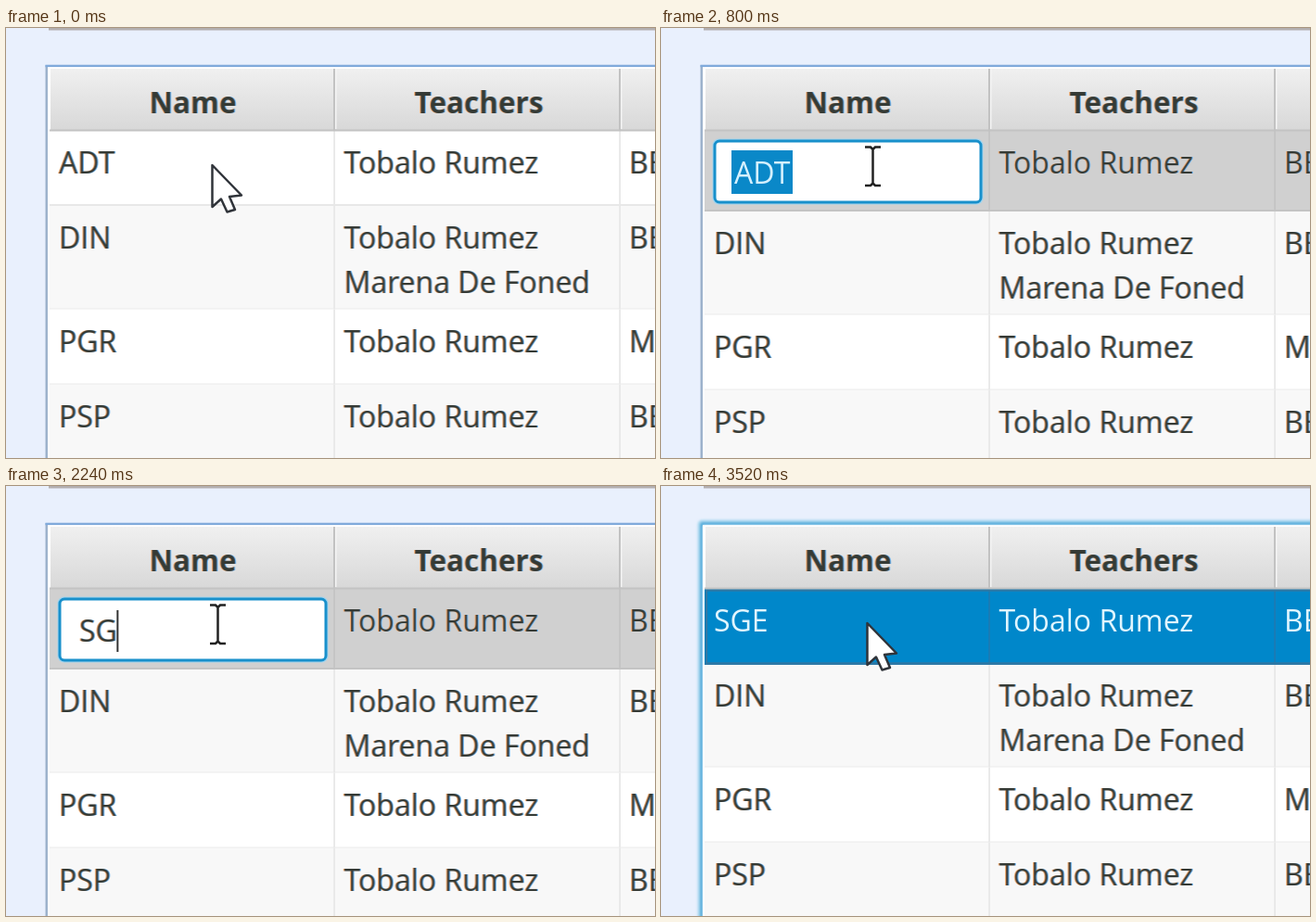
An HTML page for the animation above (3600 ms loop, 700 by 464 pixels).

```html
<!DOCTYPE html>
<html lang="en">
<head>
<meta charset="utf-8">
<title>Editable table cell</title>
<style>
  html, body { margin: 0; width: 100%; height: 100%; overflow: hidden; background: #e9f0fd; }
  svg { display: block; width: 700px; height: 464px; }
  text { font: 400 32px "Open Sans", "Noto Sans", sans-serif; fill: #3a3a3a; }
  .head { font-weight: 700; font-size: 31.5px; text-anchor: middle; }
  .lit text { fill: #e0f5ff; }
  .soft { filter: url(#fringe); }
</style>
</head>
<body>
<svg viewBox="0 0 700 464">
  <defs>
    <linearGradient id="headFill" x2="0" y2="1">
      <stop offset="0" stop-color="#f0f0f0"/>
      <stop offset="1" stop-color="#d8d8d8"/>
    </linearGradient>
    <!-- warm left and cool right edges, like subpixel text -->
    <filter id="fringe" filterUnits="userSpaceOnUse" x="0" y="0" width="700" height="464" color-interpolation-filters="sRGB">
      <feFlood flood-color="#f0b27a"/>
      <feComposite in2="SourceAlpha" operator="in"/>
      <feOffset dx="-1" result="warm"/>
      <feFlood flood-color="#7abcf0"/>
      <feComposite in2="SourceAlpha" operator="in"/>
      <feOffset dx="1" result="cool"/>
      <feFlood flood-color="#747074"/>
      <feComposite in2="SourceAlpha" operator="in" result="core"/>
      <feBlend in="warm" in2="cool" mode="multiply"/>
      <feBlend in2="core" mode="multiply"/>
      <feGaussianBlur stdDeviation="0.4"/>
    </filter>
    <filter id="glow" filterUnits="userSpaceOnUse" x="0" y="0" width="760" height="520">
      <feGaussianBlur stdDeviation="0.9"/>
    </filter>
  </defs>

  <rect width="700" height="464" fill="#e9f0fd"/>
  <rect x="46" y="-2" width="660" height="4.5" fill="#b3afb0"/>

  <g id="ring" fill="none" filter="url(#glow)">
    <rect x="41.5" y="38.5" width="690" height="450" rx="3" stroke="#a9d8f0" stroke-width="4"/>
    <rect x="43.5" y="40.5" width="690" height="450" rx="2" stroke="#4fabda" stroke-width="3"/>
  </g>
  <g id="edge">
    <rect x="42.5" y="40" width="2.5" height="440" fill="#9db2cc"/>
    <rect x="42.5" y="39.7" width="660" height="2.5" fill="#80aadb"/>
  </g>
  <rect x="45" y="42.2" width="680" height="440" fill="#fff"/>

  <g id="rows"></g>

  <rect x="48" y="44" width="660" height="66" fill="url(#headFill)"/>
  <rect x="47" y="109.5" width="660" height="2" fill="#c3c3c3"/>
  <g fill="#c2c2c2">
    <rect x="353" y="44" width="2" height="67"/>
    <rect x="661" y="44" width="2" height="67"/>
  </g>
  <g fill="#f4f4f4">
    <rect x="355" y="44" width="1.5" height="65"/>
    <rect x="663" y="44" width="1.5" height="65"/>
  </g>
  <g class="soft">
    <text class="head" x="201.5" y="92">Name</text>
    <text class="head" x="510" y="92">Teachers</text>
  </g>

  <g id="field">
    <rect x="55.5" y="119.5" width="292" height="71" rx="7" fill="#9fd3ee"/>
    <rect x="58" y="122" width="287" height="66" rx="5" fill="#fff" stroke="#1990cb" stroke-width="3"/>
    <rect id="mark" x="76" y="132" width="66" height="47" fill="#0a88c8"/>
    <text id="entry" x="79" y="168"></text>
    <rect id="caret" y="134" width="2" height="45" fill="#333"/>
  </g>

  <path id="beam" d="M220 128.5H226L228.5 131L231 128.5H237M228.5 130V168M220 170H226L228.5 167.5L231 170H237" fill="none" stroke="#222" stroke-width="2.5"/>
  <path id="arrow" d="M222.5 148V193L232 184.5L238.5 198.5L247 196L241 182L254 180.5Z" fill="#fff" stroke="#30343a" stroke-width="2.5" stroke-linejoin="round"/>
</svg>
<script>
const LOOP = 3600;
const SELECT = 320, EDIT = 560, COMMIT = 3280;
const TYPED = [[1920, "S"], [2160, "SG"], [2400, "SGE"]];
const COLS = [57, 364.5, 672];
const TUTOR = "Tobalo Rumez";
const ROWS = [
  { top: 110.5, cells: ["ADT", TUTOR, "BBE"], fill: "#fff" },
  { top: 191, cells: ["DIN", TUTOR, "BBE"], extra: "Marena De Foned", fill: "#f8f8f8" },
  { top: 303.5, cells: ["PGR", TUTOR, "ME"], fill: "#fff" },
  { top: 384.5, cells: ["PSP", TUTOR, "BBE"], fill: "#f8f8f8" }
];
const LOOKS = {
  plain: { fill: "#fff", line: "#e8e8e8", height: 81 },
  selected: { fill: "#0087ca", line: "#1c7bb3", height: 82 },
  editing: { fill: "#d0d0d0", line: "#c4c4c4", height: 87 }
};

const $ = id => document.getElementById(id);
const show = (id, on) => $(id).setAttribute("visibility", on ? "visible" : "hidden");

function add(parent, tag, attrs, content) {
  const el = document.createElementNS("http://www.w3.org/2000/svg", tag);
  for (const key in attrs) el.setAttribute(key, attrs[key]);
  if (content) el.textContent = content;
  return parent.appendChild(el);
}

const rect = (parent, x, y, width, height, fill) =>
  add(parent, "rect", { x, y, width, height, fill });

function drawRow(row, i) {
  const next = ROWS[i + 1];
  const height = (next ? next.top : 480) - row.top;
  const g = add($("rows"), "g", {});
  const back = rect(g, 47, row.top, 660, height, row.fill);
  const rule = rect(g, 47, row.top + height - 1, 660, 2, "#ebebeb");
  const bars = [353.2, 661.2].map(x => rect(g, x, row.top, 1.8, height, "#e8e8e8"));
  const words = add(g, "g", { class: "soft" });
  const base = row.top + 46.5;
  const labels = row.cells.map((t, c) => add(words, "text", { x: COLS[c], y: base }, t));
  if (row.extra) add(words, "text", { x: COLS[1], y: base + 48 }, row.extra);
  return { g, back, rule, bars, words, labels };
}

const rows = ROWS.map(drawRow);
const first = rows[0];
$("rows").append(first.g);
add(first.g, "path", { id: "frame", d: "M706 112.5H49V191.5H706", fill: "none", stroke: "#2f78a4", "stroke-width": 2.4 });

function render(t) {
  const editing = t >= EDIT && t < COMMIT;
  const selected = t >= SELECT && !editing;
  const typed = TYPED.filter(([at]) => t >= at).pop();
  const name = typed ? typed[1] : "ADT";
  const look = LOOKS[editing ? "editing" : selected ? "selected" : "plain"];

  first.back.setAttribute("fill", look.fill);
  first.back.setAttribute("height", look.height);
  first.rule.setAttribute("fill", look.line);
  first.rule.setAttribute("y", ROWS[0].top + look.height - 1.5);
  first.bars.forEach(bar => {
    bar.setAttribute("fill", look.line);
    bar.setAttribute("height", look.height);
  });
  first.words.setAttribute("class", selected ? "lit" : "soft");
  first.labels[0].textContent = editing ? "" : name;
  rows.slice(1).forEach(r => r.g.setAttribute("transform", `translate(0 ${editing ? 6 : 0})`));

  show("ring", selected);
  show("edge", !selected);
  show("frame", selected);
  show("field", editing);
  show("beam", editing);
  show("arrow", !editing);
  show("mark", editing && !typed);
  show("caret", editing && typed);

  const entry = $("entry");
  entry.textContent = name;
  entry.style.fill = typed ? "" : "#d4f0ff";
  entry.setAttribute("class", typed ? "soft" : "");
  if (editing && typed) $("caret").setAttribute("x", 78.5 + entry.getComputedTextLength());
}

const start = performance.now();
function tick(now) {
  render(Math.max(0, now - start) % LOOP);
  requestAnimationFrame(tick);
}
render(0);
requestAnimationFrame(tick);
</script>
</body>
</html>
```
